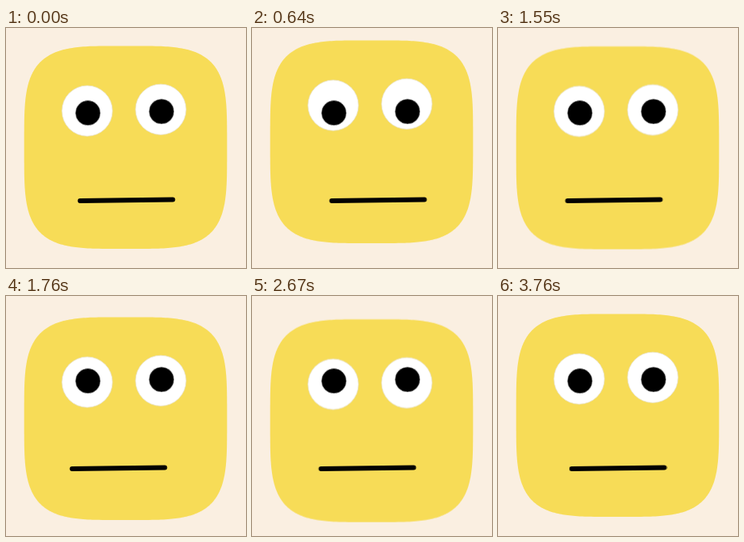
These frames come from a looping animation (300 px wide and 300 px high, 4 s). An HTML page:

```html
<!DOCTYPE html>
<html lang="en">
<head>
<meta charset="utf-8">
<title>Wandering face</title>
<style>
  html, body { margin: 0; width: 100%; height: 100%; overflow: hidden; background: #faefe1; }
  svg { display: block; width: 100vw; height: 100vh; }
  #skin { fill: #f7dc57; }
  .white { fill: #fff; stroke: #e9e3c8; stroke-width: .8; }
  .pupil { fill: #000; stroke: #c9c9c9; stroke-width: .6; }
  #mouth { stroke: #000; stroke-width: 6; stroke-linecap: round; }
</style>
</head>
<body>
<svg viewBox="0 0 300 300">
  <g id="head">
    <path id="skin"/>
    <circle class="white" cx="101.5" cy="103.6" r="31.6"/>
    <circle class="white" cx="193.5" cy="101.8" r="31.6"/>
  </g>
  <circle class="pupil" cx="102.4" cy="106.2" r="15.6"/>
  <circle class="pupil" cx="194.4" cy="104.4" r="15.6"/>
  <line id="mouth" x1="92.6" y1="216" x2="208.4" y2="214.6"/>
</svg>
<script>
  const LOOP = 4000;
  const byId = id => document.getElementById(id);

  // Superellipse outline: |x|^n + |y|^n = r^n
  function squircle(cx, cy, r, n) {
    const axis = v => r * Math.sign(v) * Math.abs(v) ** (2 / n);
    const points = [];
    for (let i = 0; i < 360; i++) {
      const a = i * Math.PI / 180;
      points.push((cx + axis(Math.cos(a))).toFixed(2) + ' ' + (cy + axis(Math.sin(a))).toFixed(2));
    }
    return 'M' + points.join('L') + 'Z';
  }

  // steps: [time in ms, x, y], joined linearly
  function drift(el, steps) {
    const frames = steps.map(([t, x, y]) => ({
      offset: t / LOOP,
      transform: `translate(${x}px, ${y}px)`
    }));
    el.animate(frames, { duration: LOOP, iterations: Infinity }).startTime = document.timeline.currentTime;
  }

  byId('skin').setAttribute('d', squircle(149.5, 149.2, 126.8, 4));

  drift(byId('head'), [
    [0, 0, 0], [920, 0, -10], [2120, 0, 10], [3760, 0, 0], [4000, 0, 0]
  ]);
  drift(byId('mouth'), [
    [0, 0, 0], [840, 9.3, 0], [1810, -11, 0], [3760, -.5, 0], [4000, -.5, 0]
  ]);
</script>
</body>
</html>
```
